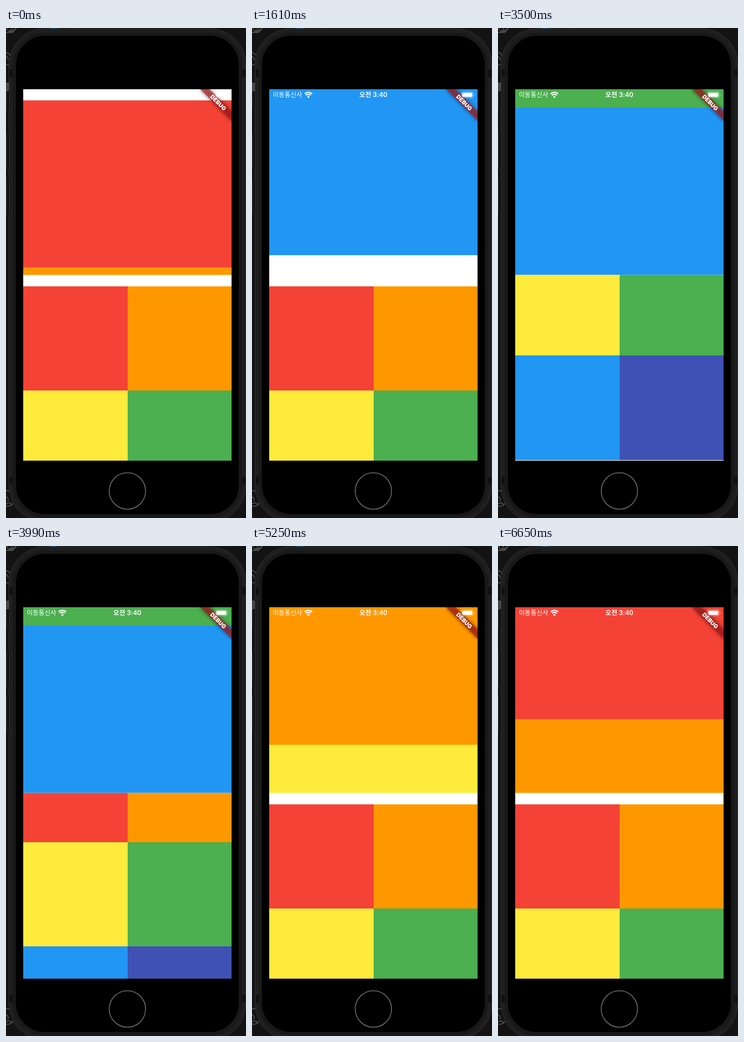
An HTML page that plays this animation: 432 by 880 pixels, repeating every 6.72 s.

```html
<!DOCTYPE html>
<html lang="ko">
<head>
<meta charset="utf-8">
<title>Scrolling list and grid</title>
<style>
  html, body { margin: 0; width: 100%; height: 100%; overflow: hidden; background: #131313; }
  svg { display: block; }
  .stage { width: 432px; height: 880px; }
  .cells { shape-rendering: crispEdges; }
  .status { fill: #fff; font: 11.5px "Noto Sans CJK KR", "Noto Sans CJK", "Noto Sans", sans-serif; }
  .time { font: 600 11.5px Inter, "Noto Sans CJK KR", "Noto Sans CJK", sans-serif; text-anchor: middle; }
  .debug { fill: #fff; font: 900 10.2px Inter, Roboto, sans-serif; text-anchor: middle; }
</style>
</head>
<body>
<svg class="stage" viewBox="0 0 432 880">
  <defs>
    <filter id="blur" x="-50%" y="-200%" width="200%" height="500%"><feGaussianBlur stdDeviation="3.5"/></filter>
  </defs>

  <!-- desktop behind the phone -->
  <rect width="432" height="880" fill="#131313"/>
  <g fill="none" stroke="#555" stroke-width="1.5">
    <path d="M0 8H12L19 0" fill="#444"/>
    <circle cx="6" cy="1" r="4"/>
    <path d="M0 44Q6 45 8 51M0 51Q4 53 4 58M0 66H5"/>
    <path d="M0 99H5V113H0" fill="#444"/>
    <circle cx="2" cy="845" r="14"/>
    <path d="M0 842A5 5 0 0 1 3 850M0 855Q7 850 10 856"/>
  </g>
  <path d="M59.5 0V5M131.5 0V4" stroke="#333"/>
  <rect x="79" y="0" width="13" height="2" fill="#17527c"/>

  <!-- phone -->
  <g fill="#0c0c0c" stroke="#333">
    <rect x="1.5" y="113" width="7" height="35" rx="2"/>
    <rect x="1.5" y="188" width="7" height="66" rx="2"/>
    <rect x="1.5" y="268.500" width="7" height="66" rx="2"/>
  </g>
  <rect x="5.500" y="1.500" width="426" height="885" rx="64" fill="#1e1e1e" stroke="#303030"/>
  <rect x="11.500" y="7.500" width="414" height="873" rx="59" fill="#181818" stroke="#222"/>
  <path d="M6 74h6v14h-6zM425 74h6v14h-6zM6 806h6v14h-6zM425 806h6v14h-6z" fill="#111"/>
  <rect x="18" y="14" width="401" height="859" rx="52"/>
  <circle cx="218.500" cy="831.500" r="32.700" fill="none" stroke="#686868" stroke-width="1.600"/>

  <!-- screen -->
  <svg x="31" y="110" width="375" height="667">
    <rect width="375" height="667" fill="#fff"/>
    <svg class="cells" width="375" height="333.500"><g id="list"></g></svg>
    <svg class="cells" y="333.500" width="375" height="333.500"><g id="grid"></g></svg>

    <g transform="translate(375) rotate(45)">
      <rect x="-40" y="28" width="80" height="12" fill="#000" opacity=".5" filter="url(#blur)"/>
      <rect x="-40" y="28" width="80" height="12" fill="#b71c1c" fill-opacity=".627"/>
      <text class="debug" x="0" y="37.700">DEBUG</text>
    </g>

    <g class="status">
      <text x="6.500" y="14.300">이동통신사</text>
      <text class="time" x="187.500" y="14.300">오전 3:40</text>
      <g fill="none" stroke="#fff" stroke-width="2.200">
        <path d="M63.700 8.300A9.600 9.600 0 0 1 77.300 8.300M66.200 10.900A6.100 6.100 0 0 1 74.800 10.900"/>
      </g>
      <path d="M70.500 16L68.100 13.400A3.600 3.600 0 0 1 72.900 13.400Z"/>
      <rect x="345.500" y="4.800" width="22" height="10.400" rx="3" fill="none" stroke="#fff" stroke-opacity=".45"/>
      <rect x="347.300" y="6.300" width="18.400" height="7.400" rx="1.700"/>
      <path d="M369 8.300a2 2 0 0 1 0 3.500z" opacity=".5"/>
    </g>
  </svg>
</svg>

<script>
const LOOP = 6720, STEP = 70;
const PADDING = 20, VIEW = 333.5, WIDTH = 375, ROW = 300, CELL = WIDTH / 2;
const COLORS = ['#f44336', '#ff9800', '#ffeb3b', '#4caf50', '#2196f3', '#3f51b5'];
const LIST_END = PADDING + 5 * ROW - VIEW;
const GRID_END = PADDING + 3 * CELL - VIEW;
const list = document.getElementById('list');
const grid = document.getElementById('grid');

function addCell(parent, x, y, width, height, fill) {
  const rect = document.createElementNS('http://www.w3.org/2000/svg', 'rect');
  for (const [key, value] of Object.entries({ x, y, width, height, fill })) rect.setAttribute(key, value);
  parent.append(rect);
}
COLORS.slice(0, 5).forEach((color, i) => addCell(list, 0, PADDING + i * ROW, WIDTH, ROW, color));
COLORS.forEach((color, i) =>
  addCell(grid, i % 2 * CELL, PADDING + (i >> 1) * CELL, CELL, CELL, color));

// A swipe: accelerating drag, friction until the edge, then an overdamped spring.
// Times in seconds; speed is the velocity on reaching the edge.
function swipe({ start, release, hit, from, edge, speed }) {
  const glide = t => edge - speed / 2 * (Math.exp(2 * (hit - t)) - 1);
  const distance = glide(release) - from;
  const power = speed * Math.exp(2 * (hit - release)) * (release - start) / distance;
  return t => {
    if (t <= start) return from;
    if (t < release) return from + distance * ((t - start) / (release - start)) ** power;
    if (t < hit) return glide(t);
    const dt = t - hit;
    return edge + speed / 12.95 * (Math.exp(-9.07 * dt) - Math.exp(-22.02 * dt));
  };
}

const listDown = swipe({ start: 1.05, release: 1.19, hit: 1.575, from: 0, edge: LIST_END, speed: 1730 });
const listUp = swipe({ start: 4.34, release: 4.75, hit: 6.72, from: LIST_END, edge: 117.3, speed: -28.54 });
const gridDown = swipe({ start: 2.8, release: 2.94, hit: 3.036, from: 0, edge: GRID_END, speed: 1150 });
const gridUp = swipe({ start: 3.71, release: 3.99, hit: 4.102, from: GRID_END, edge: 0, speed: -950 });

function draw() {
  const t = Math.floor(performance.now() % LOOP / STEP) * STEP / 1000;
  const listScroll = t < 4.3 ? listDown(t) : listUp(t);
  const gridScroll = t < 3.71 ? gridDown(t) : gridUp(t);
  list.setAttribute('transform', `translate(0 ${-listScroll})`);
  grid.setAttribute('transform', `translate(0 ${-gridScroll})`);
  requestAnimationFrame(draw);
}
draw();
</script>
</body>
</html>
```
